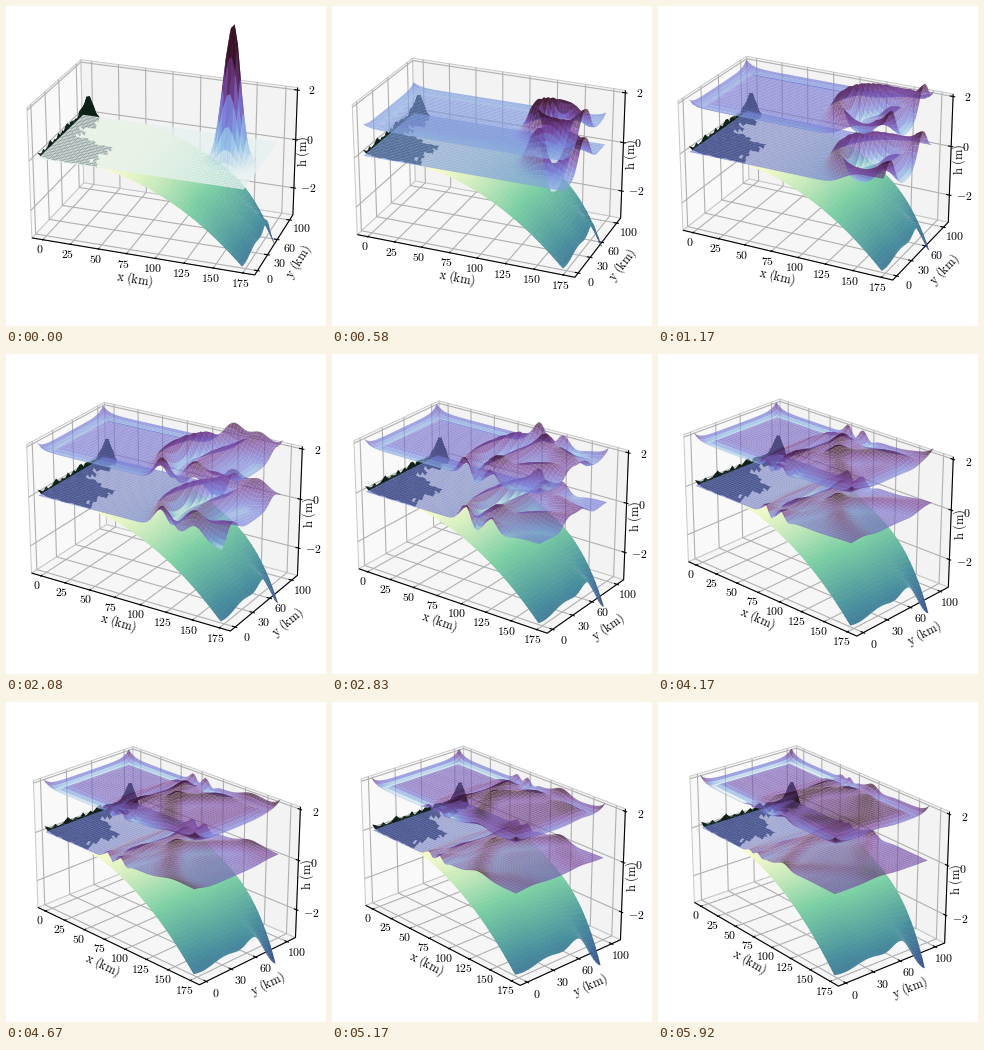
These frames come from a looping animation (320x320 px, 6 s). A matplotlib script:

```python
import numpy as np
import matplotlib.pyplot as plt
from matplotlib.animation import FuncAnimation
from matplotlib.collections import LineCollection, PolyCollection
from matplotlib.colors import LinearSegmentedColormap

plt.rcParams["mathtext.fontset"] = "cm"

SIZE, DPI = 320, 100
FRAMES, LOOP_MS = 72, 6000

# Axis limits and ticks
LIMITS = ((-10, 185), (-8, 111), (-3.14, 2.1))
TICKS = (range(0, 176, 25), (0, 30, 60, 100), (-2, 0, 2))

# Camera: half sizes of the box in pixels, screen centre, elevation
HALF = (116.5, 69.0, 70.7)
CENTRE = (158.3, 157.0)
ELEV = np.radians(24.5)
PERSPECTIVE = 0.00062

STEP = 3.0
LIFT = 1.8
SUBSTEPS = 4

WATER = LinearSegmentedColormap.from_list(
    "water", ["#e6f1f1", "#8cbce5", "#777dd9", "#75409a", "#360e24"])
SEABED = LinearSegmentedColormap.from_list(
    "seabed", ["#fdfdcc", "#7bcfa4", "#488e9e", "#3e5891", "#271a2c"])
LAND = (0.05, 0.12, 0.09, 1)


def smooth(t):
    t = np.clip(t, 0, 1)
    return t * t * (3 - 2 * t)


def bump(d, width):
    return np.exp(-(d / width) ** 2)


def norm(value, axis):
    lo, hi = LIMITS[axis]
    return 2 * (value - lo) / (hi - lo) - 1


def project(u, v, w, az):
    """Map box coordinates in -1..1 to pixels and depth."""
    x, y, z = u * HALF[0], v * HALF[1], w * HALF[2]
    s, c = -np.sin(az), np.cos(az)
    across, toward = s * x + c * y, c * x - s * y
    depth = np.cos(ELEV) * toward + np.sin(ELEV) * z
    up = np.cos(ELEV) * z - np.sin(ELEV) * toward
    f = 1 / (1 - depth * PERSPECTIVE)
    return CENTRE[0] + across * f, CENTRE[1] - up * f, depth


def point(u, v, w, az):
    return np.array(project(u, v, w, az)[:2])


def make_bed(x, y):
    """Slope down to a trench on the right, ragged flat land on the left."""
    rng = np.random.default_rng(4)
    bed = -0.05 - 2.95 * (np.clip(x - 50, 0, None) / 122) ** 1.7
    trench = 0.45 * smooth((y - 72) / 30) - 0.12 * bump(y - 70, 12)
    bed *= 1 + np.clip((x - 120) / 52, 0, 1) ** 2 * trench
    bed *= 1 + 0.03 * np.sin(y / 9 + x / 25)

    coast = 12 + 38 * smooth((55 - y[0]) / 20) + rng.uniform(-16, 5, y.shape[1])
    land = 0.02 + 0.04 * rng.random(x.shape)
    land += 0.22 * rng.random(x.shape) * np.exp(-(x + 5) / 6)
    land += 0.9 * bump(np.hypot(x - 3, y - 94), 5.5)
    land += 0.35 * bump(np.hypot(x - 8, y - 84), 5)
    return np.where(x < coast[None, :], land, bed)


def spread(a, kx, ky):
    """Divergence of k * grad(a) with closed walls."""
    flux_x, flux_y = kx * np.diff(a, axis=0), ky * np.diff(a, axis=1)
    return (np.diff(flux_x, axis=0, prepend=0, append=0)
            + np.diff(flux_y, axis=1, prepend=0, append=0)) / STEP ** 2


def simulate(bed, x, y):
    """Let a hump spread as long waves over the sea bed."""
    deep = np.maximum(-bed, 0.03)
    c2 = 1.8 ** 2 * deep
    cx, cy = (c2[1:] + c2[:-1]) / 2, (c2[:, 1:] + c2[:, :-1]) / 2
    drag = 0.05 + 0.1 * np.exp(-deep / 0.2)

    eta = 5.4 * bump(np.hypot(x - 147, y - 46), 10)
    speed = np.zeros_like(eta)
    dt, fields = 1 / SUBSTEPS, []
    for _ in range(FRAMES):
        fields.append(eta)
        for _ in range(SUBSTEPS):
            speed = speed + dt * (spread(eta, cx, cy) + spread(speed, 0.3, 0.3))
            speed *= np.exp(-drag * dt)
            eta = eta + dt * speed
    return fields


def quads(a):
    return np.stack([a[:-1, :-1], a[1:, :-1], a[1:, 1:], a[:-1, 1:]], axis=2)


def face_mean(a):
    return quads(a).mean(axis=2).ravel()


def draw_mesh(mesh, z, colors, az, grow=1.0):
    """Place the quads of a surface, far ones first."""
    px, py, depth = project(U, V, norm(z, 2), az)
    verts = quads(np.stack([px, py], axis=-1)[:, :, None, :]).reshape(-1, 4, 2)
    middle = verts.mean(axis=1, keepdims=True)
    verts = middle + grow * (verts - middle)
    order = np.argsort(face_mean(depth))
    mesh.set_verts(verts[order])
    mesh.set_facecolor(colors[order])


def water_colors(level, eta, i):
    top = eta.max() * (0.75 + 0.25 * smooth(i / 9))
    low = min(eta.min(), -0.3 * top)
    zero = 0.48 * smooth(i / 9)
    value = np.where(level > 0, zero + (1 - zero) * level / top, zero * (1 - level / low))
    colors = WATER(np.clip(value, 0, 1))
    colors[:, 3] = 0.88 - 0.16 * smooth(i / 9)
    return colors


X, Y = np.meshgrid(np.arange(-5, 173, STEP), np.arange(-1, 104, STEP), indexing="ij")
U, V = norm(X, 0), norm(Y, 1)
BED = make_bed(X, Y)
WAVES = simulate(BED, X, Y)

bed_level = face_mean(BED)
BED_COLORS = SEABED(np.clip(-bed_level / 5.4, 0, 1))
BED_COLORS[bed_level > 0] = LAND

# The upper sheet sags near its rim and turns up at the corners
rim_x = np.minimum(X - X.min(), X.max() - X)
rim_y = np.minimum(Y - Y.min(), Y.max() - Y)
SAG = 0.1 - 0.2 * bump(np.minimum(rim_x, rim_y) - 7, 6) + 0.3 * np.exp(-(rim_x + rim_y) / 6)

fig = plt.figure(figsize=(SIZE / DPI, SIZE / DPI), dpi=DPI, facecolor="white")
ax = fig.add_axes([0, 0, 1, 1])
ax.set_xlim(0, SIZE)
ax.set_ylim(SIZE, 0)
ax.axis("off")

panes = ax.add_collection(PolyCollection(
    [], facecolors=["#f6f6f6", "#f9f9f9", "#f3f3f3"], edgecolors="#c8c8c8",
    linewidths=0.7, zorder=1))
grid = ax.add_collection(LineCollection([], colors="#b0b0b0", linewidths=0.8, zorder=2))
axes_lines = ax.add_collection(LineCollection([], colors="black", linewidths=0.8, zorder=3))
bed_mesh, low_mesh, high_mesh = (
    ax.add_collection(PolyCollection([], linewidths=0, edgecolors="none", zorder=k))
    for k in (4, 5, 6))


def label(text, size):
    return ax.text(0, 0, text, fontsize=size, ha="center", va="center", zorder=7)


x_nums, y_nums, z_nums = (
    [(norm(t, k), label(f"${t}$", 8.5)) for t in ticks] for k, ticks in enumerate(TICKS))
x_name, y_name, z_name = (
    label(rf"$\mathrm{{{s}}}$", 8.9) for s in (r"x\ (km)", r"y\ (km)", r"h\ (m)"))
z_name.set_rotation(90)


def draw_box(az):
    def path(*corners):
        return np.array([point(*c, az) for c in corners])

    def slope(a, b):
        dx, dy = point(*b, az) - point(*a, az)
        return np.degrees(np.arctan2(-dy, dx))

    panes.set_verts([
        path((-1, -1, -1), (1, -1, -1), (1, 1, -1), (-1, 1, -1)),
        path((-1, -1, -1), (-1, 1, -1), (-1, 1, 1), (-1, -1, 1)),
        path((-1, 1, -1), (1, 1, -1), (1, 1, 1), (-1, 1, 1))])

    near, far, out = 0.97, 1.02, 1.11
    lines, marks = [], [path((-1, -1, -1), (1, -1, -1), (1, 1, -1), (1, 1, 1))]
    for t, num in x_nums:
        lines.append(path((t, -1, -1), (t, 1, -1), (t, 1, 1)))
        marks.append(path((t, -near, -1), (t, -far, -1)))
        num.set_position(point(t, -out, -out, az))
    for t, num in y_nums:
        lines.append(path((1, t, -1), (-1, t, -1), (-1, t, 1)))
        marks.append(path((near, t, -1), (far, t, -1)))
        num.set_position(point(out, t, -out, az))
    for t, num in z_nums:
        lines.append(path((-1, -1, t), (-1, 1, t), (1, 1, t)))
        marks.append(path((near, 1, t), (far, 1, t)))
        num.set_position(point(out, out, t, az) + (0, 1.5))
    grid.set_segments(lines)
    axes_lines.set_segments(marks)

    x_name.set_position(point(0, -1.24, -1.24, az))
    x_name.set_rotation(slope((-1, -1, -1), (1, -1, -1)))
    y_name.set_position(point(1.22, 0, -1.22, az))
    y_name.set_rotation(slope((1, -1, -1), (1, 1, -1)))
    z_name.set_position(point(1.065, 1.065, 0, az))


def update(i):
    t = i / (FRAMES - 1)
    az = np.radians(-70.5 + 31 * t + 2 * np.sin(np.pi * t))
    draw_box(az)
    draw_mesh(bed_mesh, BED, BED_COLORS, az, grow=1.15)

    eta = WAVES[i]
    draw_mesh(low_mesh, eta, water_colors(face_mean(eta), eta, i), az)

    # The second sheet rises out of the first one
    rise = min(i / 10, 1)
    upper = eta + rise * SAG
    high_mesh.set_visible(i > 0)
    draw_mesh(high_mesh, upper + rise * LIFT, water_colors(face_mean(upper), eta, i), az)
    return []


anim = FuncAnimation(fig, update, frames=FRAMES, interval=LOOP_MS / FRAMES,
                     repeat=True, repeat_delay=0, blit=False)
plt.show()
```
